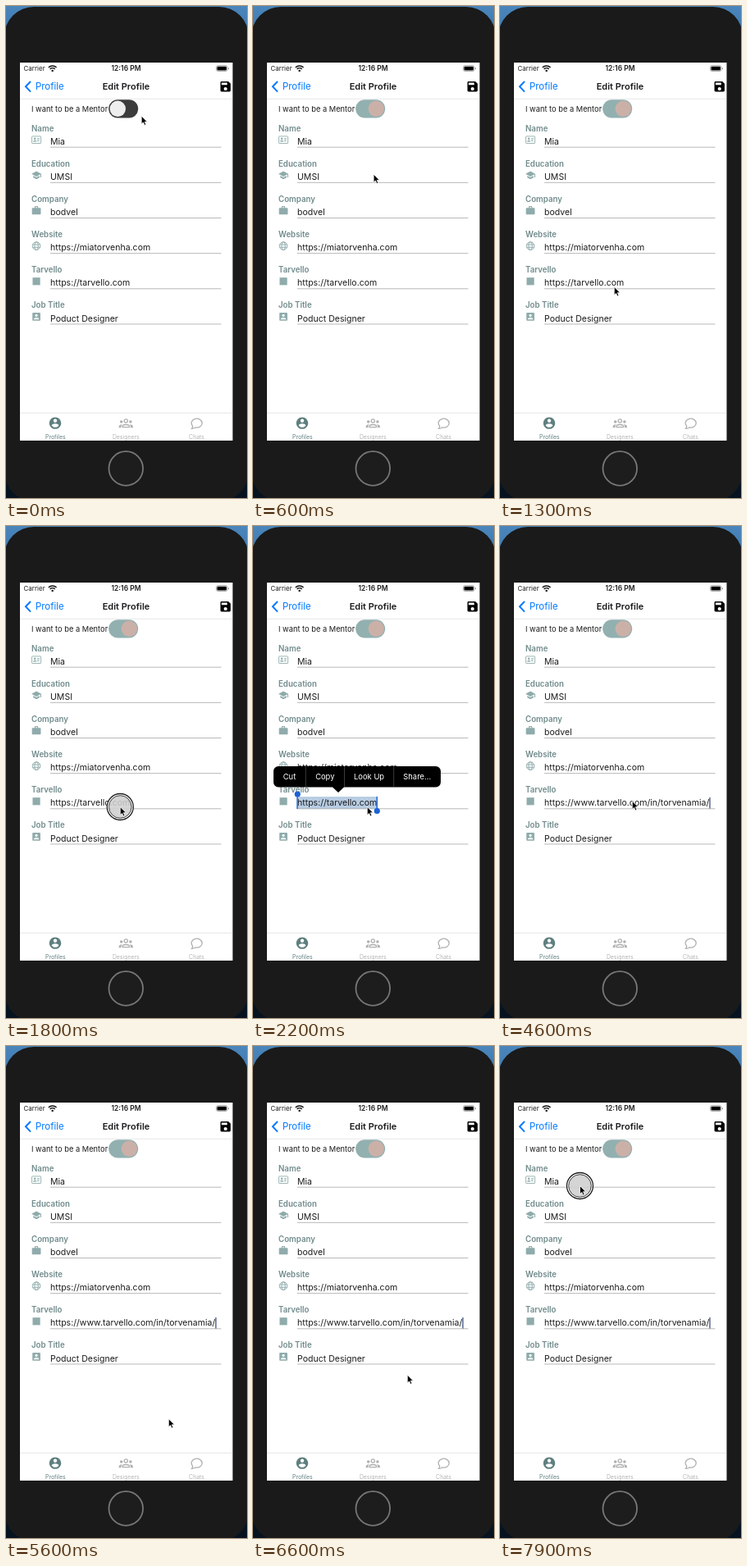
Recreate the animation shown at these times as an HTML page. Size 294 by 600 pixels, loop 8 s.

```html
<!DOCTYPE html>
<html lang="en">
<head>
<meta charset="utf-8">
<title>Edit Profile</title>
<style>
html, body { margin: 0; width: 100%; height: 100%; overflow: hidden; background: #1b1b1b; }
svg { display: block; width: 294px; height: 600px; }
text { font-family: Inter, Roboto, sans-serif; fill: #1c1c1e; }
.mid { text-anchor: middle; }
.label { font-size: 9.7px; font-weight: 600; fill: #718b8c; }
.value { font-size: 10.55px; }
.tab { font-size: 6.9px; text-anchor: middle; fill: #b4b4b4; }
.menu text { font-size: 9.4px; fill: #fff; text-anchor: middle; }
.line { fill: none; stroke: currentColor; }
</style>
</head>
<body>
<svg viewBox="0 0 294 600" xmlns="http://www.w3.org/2000/svg">
  <defs>
    <linearGradient id="desk" x2="0" y2="1">
      <stop offset="0" stop-color="#4a86bc"/>
      <stop offset=".06" stop-color="#3d78ae"/>
      <stop offset=".9" stop-color="#07182a"/>
      <stop offset="1" stop-color="#06121f"/>
    </linearGradient>
  </defs>

  <!-- phone -->
  <rect width="294" height="600" fill="url(#desk)"/>
  <rect x="-2" y="1" width="298" height="603" rx="36" fill="#1a1a1a"/>
  <rect x="17" y="69" width="259.5" height="461" fill="#fff"/>
  <circle cx="146.3" cy="564" r="20.8" fill="#1d1d1d" stroke="#777" stroke-width="1.8"/>

  <!-- status bar -->
  <text x="21.5" y="79" font-size="8">Carrier</text>
  <g color="#111" stroke-width="1.5">
    <path class="line" d="M51.8 75a7 7 0 0 1 9.800 0M53.7 77a4.300 4.300 0 0 1 6 0"/>
    <circle cx="56.7" cy="78.9" r="1.2"/>
  </g>
  <text class="mid" x="146.5" y="79" font-size="8.5" font-weight="600">12:16 PM</text>
  <rect x="256.5" y="72.7" width="13.5" height="6.8" rx="2" fill="none" stroke="#888" stroke-width=".7"/>
  <rect x="257.5" y="73.7" width="11.5" height="4.8" rx="1.2"/>
  <path d="M270.8 75v2.300q1-.4 1-1.150t-1-1.150z" fill="#777"/>

  <!-- navigation bar -->
  <path d="M30 92l-6 6.300 6 6.300" fill="none" stroke="#007aff" stroke-width="2"/>
  <text x="36" y="102.3" font-size="11.4" style="fill:#007aff">Profile</text>
  <text class="mid" x="146.5" y="102.3" font-size="11" font-weight="600">Edit Profile</text>
  <path transform="translate(259.5 90) scale(.69)" d="M17 3H5c-1.110 0-2 .9-2 2v14c0 1.100.89 2 2 2h14c1.100 0 2-.9 2-2V7l-4-4zm-5 16c-1.660 0-3-1.340-3-3s1.340-3 3-3 3 1.340 3 3-1.340 3-3 3zm3-10H5V5h10v4z"/>
  <path d="M17 113.3H276" stroke="#ddd" stroke-width=".7"/>

  <!-- mentor switch -->
  <text x="31" y="128.9" font-size="9.3">I want to be a Mentor</text>
  <rect id="track" x="125.2" y="114.2" width="36" height="22.2" rx="11.1"/>
  <circle id="thumb" cy="125.3" r="9.7"/>

  <g id="form"></g>

  <!-- tab bar -->
  <path d="M17 496.3H276" stroke="#ddd" stroke-width=".7"/>
  <path transform="translate(51.4 500) scale(.72)" fill="#5f7f80" d="M12 2C6.480 2 2 6.480 2 12s4.480 10 10 10 10-4.480 10-10S17.520 2 12 2zm0 3c1.660 0 3 1.340 3 3s-1.340 3-3 3-3-1.340-3-3 1.340-3 3-3zm0 14.200c-2.500 0-4.710-1.280-6-3.220.03-1.990 4-3.080 6-3.080 1.990 0 5.970 1.090 6 3.080-1.290 1.940-3.500 3.220-6 3.220z"/>
  <g color="#b0b0b0" stroke-width="1.3">
    <circle class="line" cx="146.3" cy="506" r="2.1"/>
    <path class="line" d="M142 513.7v-.8c0-3.200 8.600-3.200 8.600 0v.8z"/>
    <g fill="currentColor">
      <circle cx="140.7" cy="507" r="1.8"/>
      <circle cx="151.9" cy="507" r="1.8"/>
      <path d="M137.7 514.3v-1.500q.2-2.500 4-2.600-1.600 1.500-1.300 4.100zM154.9 514.3v-1.500q-.2-2.500-4-2.600 1.600 1.500 1.300 4.100z"/>
    </g>
    <path class="line" d="M227.7 512.2a6.500 5.500 0 1 1 3.300 1.800q-1.800 1.300-4.300 1.300 1.300-1.400 1-3.100z"/>
  </g>
  <text class="tab" x="60.3" y="528" style="fill:#5f7f80">Profiles</text>
  <text class="tab" x="146.3" y="528">Designers</text>
  <text class="tab" x="232.5" y="528">Chats</text>

  <!-- text selection -->
  <g id="handles" stroke="#1a63d8" stroke-width="1.4" fill="#1a63d8">
    <path d="M54 327V345"/>
    <circle cx="54.3" cy="327" r="2.9"/>
    <g id="endHandle"><path d="M0 330V347"/><circle cy="347.5" r="2.9"/></g>
  </g>
  <path id="caret" stroke="#39507f" stroke-width="1.3"/>
  <g id="menu" class="menu">
    <path d="M31 293H223a6 6 0 0 1 6 6V312.5a6 6 0 0 1-6 6H111L104 325 97 318.5H31a6 6 0 0 1-6-6V299a6 6 0 0 1 6-6z"/>
    <path d="M64.3 293V318.5M111.5 293V318.5M171.7 293V318.5" stroke="#555" stroke-width=".7"/>
    <text x="44.5" y="309.3">Cut</text>
    <text x="87.8" y="309.3">Copy</text>
    <text x="141.6" y="309.3">Look Up</text>
    <text x="200.2" y="309.3">Share...</text>
  </g>

  <g id="pointer">
    <g id="press" fill="none">
      <circle r="15" fill="#cfcfcf" fill-opacity=".88" stroke="#fff" stroke-width="2"/>
      <circle r="16" stroke="#1c1c1c" stroke-width="1.3"/>
      <circle r="13.8" stroke="#333" stroke-width=".9"/>
    </g>
    <path d="M0 0V10L2.300 7.900 3.800 11.400 5.600 10.600 4.100 7.200H7.200Z" stroke="#fff" stroke-width=".8" stroke-linejoin="round"/>
  </g>
</svg>
<script>
const $ = id => document.getElementById(id);
const set = (el, attrs) => { for (const k in attrs) el.setAttribute(k, attrs[k]); };

const SHORT_URL = 'https://tarvello.com';
const LONG_URL = 'https://www.tarvello.com/in/torvenamia/';

// Icons live on a 24 unit grid.
const icons = {
  card: '<g class="line" stroke-width="1.6"><rect x="1.8" y="4" width="20.4" height="16" rx="1"/><path d="M14 9h5M14 12h5M14 15h4"/></g><circle cx="8.5" cy="9.5" r="2.3"/><path d="M4.500 16.500c0-4.500 8-4.500 8 0z"/>',
  school: '<path d="M5 13.180v4L12 21l7-3.820v-4L12 17l-7-3.820zM12 3L1 9l11 6 9-4.910V17h2V9L12 3z"/>',
  work: '<path d="M20 6h-4V4c0-1.110-.89-2-2-2h-4c-1.110 0-2 .89-2 2v2H4c-1.110 0-2 .89-2 2v11c0 1.110.89 2 2 2h16c1.110 0 2-.89 2-2V8c0-1.110-.89-2-2-2zm-6 0h-4V4h4v2z"/>',
  globe: '<g class="line" stroke-width="1.8"><circle cx="12" cy="12" r="9"/><ellipse cx="12" cy="12" rx="4" ry="9"/><path d="M4 9h16M4 15h16"/></g>',
  square: '<path d="M3.500 3.500h17v17h-17z"/>',
  badge: '<path d="M3 5v14c0 1.100.89 2 2 2h14c1.100 0 2-.9 2-2V5c0-1.100-.9-2-2-2H5c-1.110 0-2 .9-2 2zm12 4c0 1.660-1.340 3-3 3s-3-1.340-3-3 1.340-3 3-3 3 1.340 3 3zm-9 8c0-2 4-3.100 6-3.100s6 1.100 6 3.100v1H6v-1z"/>'
};

const fields = [
  ['Name', 'Mia', 'card'],
  ['Education', 'UMSI', 'school'],
  ['Company', 'bodvel', 'work'],
  ['Website', 'https://miatorvenha.com', 'globe'],
  ['Tarvello', SHORT_URL, 'square'],
  ['Job Title', 'Poduct Designer', 'badge']
];

$('form').innerHTML = fields.map(([label, value, icon], i) => `
  <g transform="translate(0 ${i * 43.15})">
    <text class="label" x="31" y="152.5">${label}</text>
    <g transform="translate(30.6 156.7) scale(.54)" fill="#8fabab" color="#8fabab">${icons[icon]}</g>
    ${i === 4 ? '<rect id="selection" x="54" y="157.5" height="15" fill="#b7cce2"/>' : ''}
    <text class="value" x="54" y="168.9" ${i === 4 ? 'id="link"' : ''}>${value}</text>
    <path d="M54 172.2H262.5" stroke="#b2b2b2" stroke-width=".9"/>
  </g>`).join('');

const clamp = v => Math.max(0, Math.min(1, v));
const ramp = (t, a, b) => clamp((t - a) / (b - a));
const ease = p => p * p * (3 - 2 * p);
const mix = (a, b, p) => a + (b - a) * p;
const blend = (a, b, p) => `rgb(${a.map((v, i) => Math.round(mix(v, b[i], p)))})`;
const within = (t, a, b) => t >= a && t < b;
const show = (el, on) => set(el, { opacity: +on });

// time, x, y of the pointer tip
const path = [
  [0, 165.2, 134], [200, 152, 126], [400, 151, 126], [900, 140, 351],
  [1000, 140, 351], [1300, 139.3, 342.5], [4000, 139.3, 342.5],
  [4300, 150, 350], [4600, 161.3, 335.5], [4900, 161.3, 335.5],
  [5700, 200, 460], [5800, 200, 460], [6600, 188.3, 401], [6700, 188.3, 401],
  [7500, 102, 182], [7800, 97.5, 170.5], [8000, 97.5, 170.5]
];
const presses = [[200, 400], [1500, 1600], [1800, 1900], [7800, 8000]];

function pointerAt(t) {
  const i = Math.max(1, path.findIndex(k => k[0] > t));
  const [t0, x0, y0] = path[i - 1], [t1, x1, y1] = path[i];
  const p = ease(ramp(t, t0, t1));
  return [mix(x0, x1, p), mix(y0, y1, p)];
}

const link = $('link');

function draw(t) {
  const on = ease(ramp(t, 200, 500));
  set($('track'), { fill: blend([60, 60, 60], [146, 176, 176], on) });
  set($('thumb'), { cx: mix(136.3, 150.3, on), fill: blend([238, 238, 238], [203, 176, 168], on) });

  const pasted = t >= 4300;
  const url = pasted ? LONG_URL : SHORT_URL;
  if (link.textContent !== url) link.textContent = url;
  const width = link.getComputedTextLength();
  const selected = within(t, 1900, 4300);
  set($('selection'), { width });
  set($('endHandle'), { transform: `translate(${54 + width} 0)` });
  set($('caret'), { d: `M${54.8 + width} 331V344.5` });
  show($('selection'), selected);
  show($('handles'), selected);
  show($('caret'), pasted && (t + 450) % 1000 < 500);
  set($('menu'), { opacity: ramp(t, 1900, 2200) * (1 - ramp(t, 4200, 4500)) });

  const [x, y] = pointerAt(t);
  set($('pointer'), { transform: `translate(${x} ${y})` });
  show($('press'), presses.some(([a, b]) => within(t, a, b)));
}

const start = performance.now();
function tick() {
  const t = (performance.now() - start) % 8000;
  draw(Math.floor(t / 100) * 100);
  requestAnimationFrame(tick);
}
tick();
</script>
</body>
</html>
```
